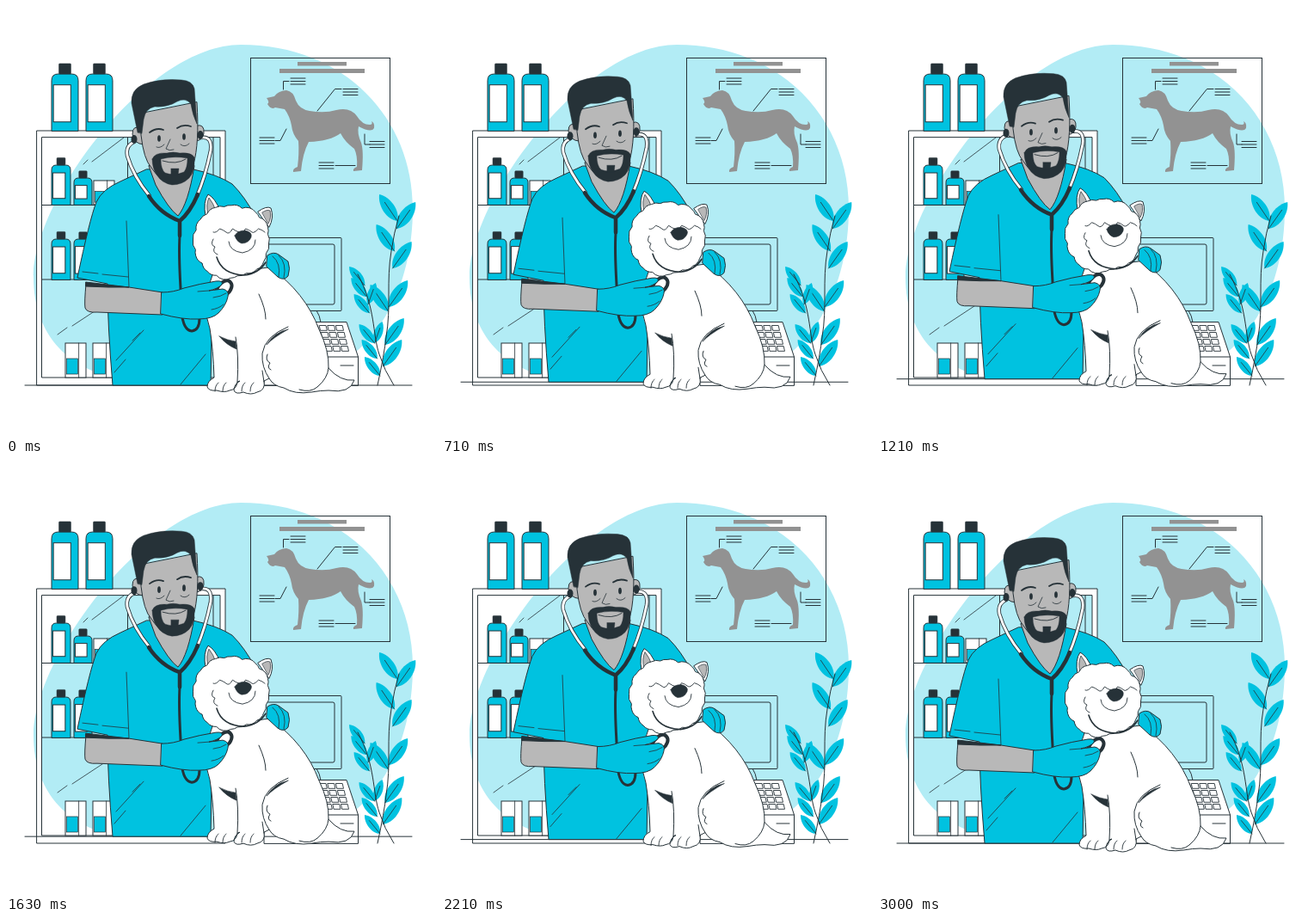
An HTML page for the animation above (3.04 s loop, 500 px wide and 500 px high).

```html
<!DOCTYPE html>
<html lang="en">
<head>
<meta charset="utf-8">
<title>Vet check-up</title>
<style>
html, body { margin: 0; width: 100%; height: 100%; overflow: hidden; background: #fff; }
svg { display: block; width: 100vw; height: 100vh; }
path { stroke-linecap: round; stroke-linejoin: round; fill-rule: evenodd; }
</style>
</head>
<body>
<svg id="stage" viewBox="0 0 500 500"></svg>
<script>
const INK = '#263238', CYAN = '#00c2e0', PALE = '#b2ecf5', SKIN = '#b8b8b8', GRAY = '#929292', WHITE = '#fff';

const path = (d, fill = 'none', width = 1) =>
  `<path d="${d}" fill="${fill}" stroke="${width ? INK : 'none'}" stroke-width="${width}"/>`;
const box = (x, y, w, h, fill = 'none', width = 1, r = 0) =>
  `<rect x="${x}" y="${y}" width="${w}" height="${h}" rx="${r}" fill="${fill}" stroke="${width ? INK : 'none'}" stroke-width="${width}"/>`;
const oval = (x, y, rx, ry) => `<ellipse cx="${x}" cy="${y}" rx="${rx}" ry="${ry}" fill="${INK}"/>`;
const repeat = (n, make) => Array.from({ length: n }, (_, i) => make(i)).join('');
const noise = i => { const v = Math.sin(i * 12.9898 + 4) * 43758.5453; return v - Math.floor(v); };

function bottle(x, base, h, w) {
  const top = base - h, r = w * .25, capW = w * .45;
  return path(`M${x} ${base}V${top + r}Q${x} ${top} ${x + r} ${top}H${x + w - r}Q${x + w} ${top} ${x + w} ${top + r}V${base}Z`, CYAN) +
    box(x + (w - capW) / 2, top - w * .39, capW, w * .39, INK, .5, 1) +
    box(x + w * .07, top + w * .41, w * .65, h - w * .74, WHITE);
}

const carton = (x, y, w, h) => box(x, y, w, h, WHITE) +
  box(x + 1.5, y + h * .45, w * .54, h * .45, CYAN, .7) + path(`M${x + w * .65} ${y}v${h}`, 'none', .8);

function shelf() {
  return path('M36 145H255V441H36ZM41.5 153V432H249V153Z', WHITE) +
    path('M41.5 231.5H249M41.5 318H249M141.5 153V231M241 153V231') +
    path('M137 153L100 181M95 179L90 184M118 345L77 372M71 374L60 382', 'none', .8) +
    bottle(53, 145, 66, 31) + bottle(93, 145, 66, 31) +
    bottle(53, 231, 46, 22) + bottle(79, 231, 31, 21) + carton(102, 203, 24, 28) +
    bottle(53, 318, 47, 22) + bottle(79, 318, 47, 21) +
    carton(69, 392, 24, 40) + carton(101, 392, 24, 40);
}

function poster() {
  const note = (x, y) => path(repeat(3, i => `M${x} ${y + i * 3.5}h17`));
  return box(284.5, 60.5, 162, 146) + box(339, 65, 57, 4.5, GRAY, 0) + box(318, 73, 99, 5, GRAY, 0) +
    note(331, 84) + note(392, 96.5) + note(295, 153) + note(423, 157.5) + note(364, 182) +
    path('M329 87.5H322.5V97M390 96.5H382.5L362 122M313 156.5H319L326 143M423 161H417V149M383 185.5H406') +
    path('M304 114Q307 112 303 107L312 105Q316 99 326 98Q334 99 337 110Q341 120 353 122Q371 125 384 121Q400 117 408 128Q414 138 423 138Q427 138 425 134Q429 136 428 142Q425 148 410 140Q408 148 413 159Q416 168 414 191L404 192Q403 189 408 187Q409 174 405 166Q394 158 389 148Q377 157 352 158Q345 171 343 192L334 193Q333 189 339 187Q341 171 340 157Q333 149 332 139Q330 128 324 120L313 118Q308 121 304 114Z', GRAY, 0);
}

function computer() {
  const key = i => {
    const row = Math.floor(i / 4);
    return path(`M${355 + i % 4 * 9.6 + row * 2} ${371.5 + row * 8}h7.4l1.3 5.8h-7.4Z`, WHITE, .9);
  };
  return path('M361 354Q365 360 366 368H340V354Z', PALE) + box(290, 269.5, 100, 85, PALE, 1, 1) + box(297, 277, 85, 70, 'none', 1, 2) +
    path('M300 441V408L315 367.5H396L409.5 408V441Z', WHITE) + path('M300 408H409.5M389 418H404') + repeat(16, key);
}

// Leaves rise from a slanted stem; each letter in sides picks left or right
function branch(heights, sides, stemX, left, right) {
  return heights.map((y, i) => {
    const x = stemX(y), [dx, dy] = sides[i] === 'L' ? left : right;
    const at = (t, s) => `${x + dx * t - s * dy * .25} ${y + dy * t + s * dx * .25}`;
    return path(`M${x} ${y}C${at(.22, 1)} ${at(.72, 1)} ${x + dx} ${y + dy}C${at(.72, -1)} ${at(.22, -1)} ${x} ${y}Z`, CYAN, 0) +
      path(`M${x} ${y}L${x + dx * .7} ${y + dy * .7}`, 'none', .8);
  }).join('');
}

function plants() {
  return branch([250, 259, 285, 305, 355, 350, 394, 419], 'LRLRLRRR', y => 436 + (441 - y) * .1, [-21, -31], [22, -31]) +
    branch([325, 338, 357, 347, 392, 392, 410, 430], 'LLLRRLLL', y => 435 - (430 - y) * .17, [-18, -22], [9, -25]) +
    path('M432 441Q440 404 442 385C448 350 442 320 448 285Q451 264 457 244M451 441Q440 424 434 405C426 382 430 350 409 312');
}

function man() {
  const tube = d => path(d, 'none', 4.5) + `<path d="${d}" fill="none" stroke="${WHITE}" stroke-width="2.8"/>`;
  return path('M163 190L133 204Q112 213 105 228Q97 249 83 316L118 323Q118 370 124 441H238L240 320L290 245Q278 222 263 207Q246 196 218 190Z', CYAN) +
    path('M166 186L174 208Q189 236 200 244Q212 230 219 186Z', SKIN) +
    // head
    path('M157 142Q147 138 147 149Q148 160 160 161M222 139Q231 137 230 148Q229 156 221 157', SKIN) +
    path('M157 125V150Q160 178 169 188Q180 205 195 207Q212 205 218 184Q225 160 222 112Z', SKIN) +
    path('M153 147L146 113Q145 97 160 91Q180 84 204 86Q217 87 219 96L222 137Q217 127 215 114Q209 106 199 111Q188 118 173 117Q162 119 160 132L158 148Z', INK, .5) +
    path('M170 178Q173 170 187 171Q194 169 202 171Q216 170 219 176Q220 192 213 200Q205 208 193 208Q181 206 175 196Q170 188 170 178ZM180 178Q180 190 185 194Q195 198 207 193Q211 188 211 177Q195 174 180 178Z', INK, .4) +
    path('M182 180Q198 185 209 178', 'none', .9) + path('M192 189H201L200 197H192Z', INK, .4) +
    oval(178, 154, 1.9, 3.8) + oval(207, 152, 1.9, 3.8) +
    path('M167 147Q175 141 183 144M199 142Q206 137 215 140', 'none', 1.8) +
    path('M191 155L186 166Q190 169 195 167M175 164Q179 166 184 161M203 161Q208 165 213 160', 'none', .8) +
    // scrub folds
    path('M140 250L143 327M89 309L107 311M112 312L142 315M128 412L160 377M126 426L139 411M147 389L156 380M203 440L232 405', 'none', .8) +
    // stethoscope
    tube('M149 158Q139 162 141 174Q148 198 167 221') + tube('M227 153Q240 151 238 168Q232 198 222 221') +
    oval(149, 155, 3.5, 5) + oval(226, 150, 3.5, 5) +
    path('M166 221Q180 242 202 250Q214 240 223 219M202 250V267', 'none', 4.5) +
    path('M202 267C200 300 204 330 204 355Q206 377 216 378Q225 377 225 363', 'none', 3) +
    // forearm
    path('M93 323Q91 345 92 351Q94 357 106 356L182 359V333L143 327Z', SKIN) +
    path('M93 321L143 327H119L93 326Z', INK);
}

function dogBody() {
  const toe = x => path(`M${x} 448Q${x} 441 ${x + 4} 438`, 'none', .9);
  return path('M240 313Q226 346 237 375Q241 400 242 432Q234 436 234 443Q236 448 245 447Q254 450 260 447Q268 446 269 437L272 436Q265 440 265 447Q267 452 276 449Q285 453 292 449Q302 447 300 436L306 433Q311 442 323 444Q336 452 355 449Q366 447 375 447Q400 451 405 435Q389 437 375 421Q376 401 364 376Q348 333 307 304Z', WHITE) +
    path('M267 385Q271 407 269 437M298 424L300 437M294 335Q302 352 302 364M328 373Q301 384 298 404Q297 420 306 433M375 421Q374 433 362 443Q354 450 341 446M304 405Q301 412 307 415Q303 421 308 423') +
    [243, 252, 274, 284].map(toe).join('') +
    path('M248 384Q258 389 267 390L268 399Q256 394 248 384ZM328 376Q312 379 303 394Q310 386 328 376Z', INK, .6);
}

function hands() {
  return path('M304 290Q311 285 317 289L328 297Q331 305 328 314Q323 320 316 315L303 303Z', CYAN) +
    path('M310 291Q320 299 317 315M317 290Q327 299 323 316', 'none', .8) +
    path('M244 331Q250 319 258 319Q266 323 260 332L250 342', 'none', 4) +
    path('M181 333Q195 333 207 328Q225 323 244 320Q253 319 251 324Q246 329 236 331L252 329Q260 331 258 338Q256 348 247 357Q240 364 224 364Q206 365 180 358Z', CYAN) +
    path('M236 331L223 332M256 334Q250 338 241 339M253 347Q247 352 239 353', 'none', .8);
}

// Ring of uneven locks around the head
function mane(cx, cy, rx, ry, locks) {
  const point = i => {
    const a = (i + noise(i) * .5) / locks * 2 * Math.PI, k = .95 + noise(i + 50) * .08;
    return `${cx + rx * k * Math.cos(a)} ${cy + ry * k * Math.sin(a)}`;
  };
  return `M${point(0)}` + repeat(locks, i => `A13 13 0 0 1 ${point((i + 1) % locks)}`) + 'Z';
}

function dogHead() {
  const ear = (d, inner) => path(d, WHITE) + path(inner, SKIN, .7);
  const fringe = 'M241 263' + repeat(8, i => `q${2 + noise(i) * 3} ${4 - noise(i + 9) * 3} 7.5 ${i % 2 ? 4 : -4}`);
  return ear('M232 245Q229 227 235 219Q243 223 249 238Z', 'M235 242Q232 231 236 223Q241 229 244 238Z') +
    ear('M293 239Q303 232 308 235Q312 246 306 257Z', 'M298 240Q304 236 307 238Q309 246 305 253Z') +
    path(mane(262, 274, 45, 42, 24), WHITE) + path(fringe, 'none', .9) +
    path('M241 271Q237 278 243 280Q239 286 246 289', 'none', .9) +
    path('M266 267Q269 261 278 261Q287 263 285 269Q282 276 274 276Q268 274 266 267Z', INK, .6) +
    path('M259 274Q260 285 275 287Q290 284 290 272', 'none', .9) +
    path('M245 292Q251 312 277 313Q294 311 302 298', 'none', 1.6);
}

document.getElementById('stage').innerHTML =
  path('M273 45C395 45 473 132 473 235C473 330 430 400 370 425C300 440 200 445 140 435C75 425 32 385 32 315C32 225 165 45 273 45Z', PALE, 0) +
  shelf() + poster() + computer() + plants() +
  `<g id="patients">${path('M22 441H472') + man() + dogBody() + hands() + dogHead()}</g>`;

const LOOP = 3040, LEAD = 20, LIFT = 8;
const patients = document.getElementById('patients');
const start = performance.now();
function draw() {
  const turn = (performance.now() - start + LEAD) / LOOP;
  const y = -LIFT * (1 - Math.cos(turn * 2 * Math.PI)) / 2;
  patients.setAttribute('transform', `translate(0 ${y.toFixed(2)})`);
  requestAnimationFrame(draw);
}
draw();
</script>
</body>
</html>
```
